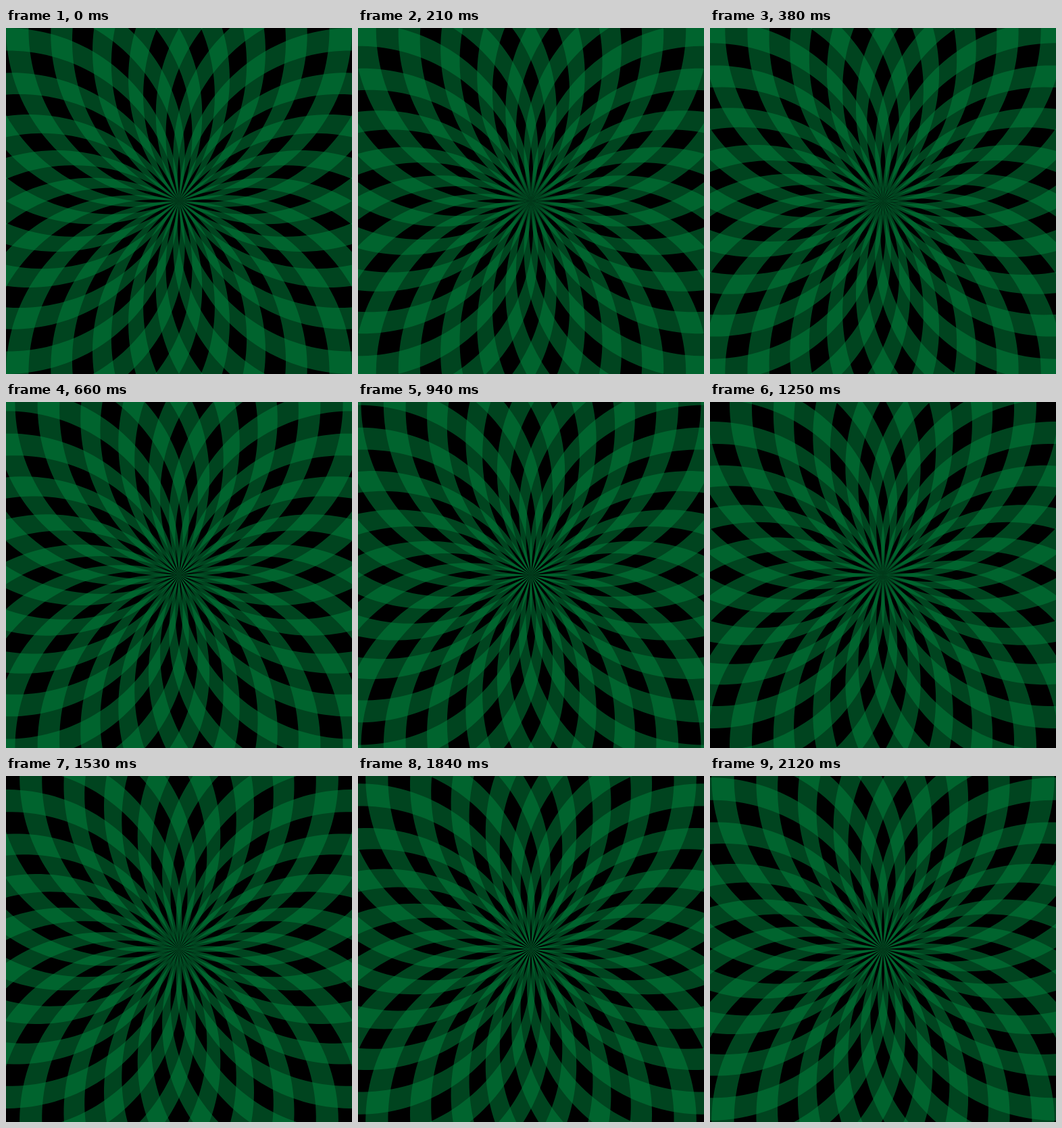
An HTML page with a canvas for the animation above (2.19 s loop, 512 px wide and 512 px high).

```html
<!DOCTYPE html>
<html>
<head>
<meta charset="utf-8">
<style>
html, body { margin: 0; width: 100%; height: 100%; overflow: hidden; background: #000; }
canvas { display: block; width: 512px; height: 512px; }
</style>
</head>
<body>
<canvas id="stage" width="512" height="512"></canvas>
<script>
const ctx = document.getElementById('stage').getContext('2d');
const SIZE = 512;
const ARMS = 24;
const STEPS = 30;
const DIAMETER = SIZE; // every arm edge is an arc of a circle through the centre
const REACH = Math.asin(370 / DIAMETER);
const SAMPLES = 48;
const PITCH = 2 * Math.PI / ARMS;

// Each group of ten steps holds its fifth step longer.
const delays = Array.from({ length: STEPS }, (_, i) => i % 10 === 4 ? 100 : 70);
const LOOP = delays.reduce((a, b) => a + b);

function stepAt(ms) {
  let t = ms % LOOP;
  let i = 0;
  while (t >= delays[i]) t -= delays[i++];
  return i;
}

function edgePoint(path, angle, i) {
  const bend = REACH * i / SAMPLES;
  const r = DIAMETER * Math.sin(bend);
  path.lineTo(r * Math.cos(angle - bend), -r * Math.sin(angle - bend));
}

function armsPath(turn) {
  const path = new Path2D();
  for (let n = 0; n < ARMS; n++) {
    const end = n * PITCH + turn;
    path.moveTo(0, 0);
    for (let i = 1; i <= SAMPLES; i++) edgePoint(path, end - PITCH / 2, i);
    for (let i = SAMPLES; i > 0; i--) edgePoint(path, end, i);
    path.closePath();
  }
  return path;
}

function draw(step) {
  const arms = armsPath(PITCH * step / STEPS);
  ctx.globalAlpha = 1;
  ctx.fillStyle = '#000';
  ctx.fillRect(0, 0, SIZE, SIZE);
  ctx.globalAlpha = 0.53;
  ctx.fillStyle = '#00803c';
  for (const flip of [1, -1]) {
    ctx.setTransform(1, 0, 0, flip, SIZE / 2, SIZE / 2);
    ctx.fill(arms);
  }
  ctx.resetTransform();
}

const start = performance.now();
let shown = -1;

function tick() {
  const step = stepAt(performance.now() - start);
  if (step !== shown) draw(shown = step);
  requestAnimationFrame(tick);
}
tick();
</script>
</body>
</html>
```
